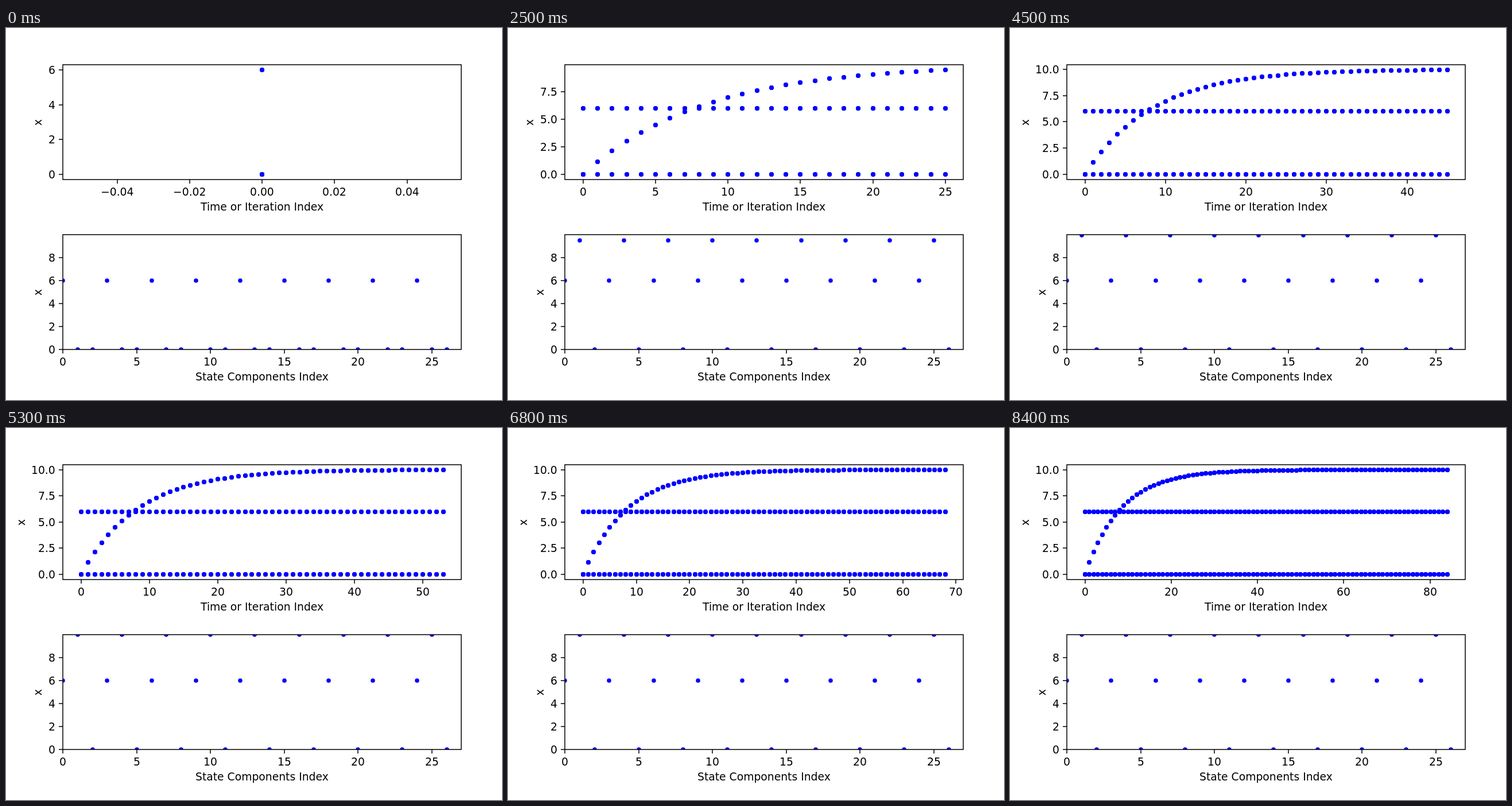
Recreate the animation shown at these times as an HTML page with a canvas. Size 864 by 648 pixels, loop 8.5 s.

```html
<!DOCTYPE html>
<html lang="en">
<head>
<meta charset="utf-8">
<title>State plot</title>
<style>
  html, body { margin: 0; width: 100%; height: 100%; overflow: hidden; background: #fff; }
  canvas { display: block; }
</style>
</head>
<body>
<canvas id="stage" width="864" height="648"></canvas>
<script>
const ctx = document.getElementById("stage").getContext("2d");
const STEP_MS = 100, STEPS = 85;
const FONT_SIZE = 18.75, TICK = 7, TICK_PAD = 13.1;
const LEFT = 99.3, WIDTH = 694, HEIGHT = 200;
const COMPONENTS = 27, FIXED = 6;

const rising = n => 10 * (1 - Math.exp(-0.1193 * n));

// Smallest "nice" step that gives at most maxBins intervals.
function niceStep(range, maxBins) {
  const raw = range / maxBins - 1e-9;
  const scale = 10 ** Math.floor(Math.log10(raw));
  return [1, 2, 2.5, 5, 10].find(m => m * scale >= raw) * scale;
}

function makeTicks([lo, hi], maxBins) {
  const step = niceStep(hi - lo, maxBins);
  let decimals = 0;
  while (Math.abs(step * 10 ** decimals - Math.round(step * 10 ** decimals)) > 1e-6) decimals++;
  const ticks = [];
  for (let k = Math.ceil(lo / step - 1e-9); k * step <= hi + 1e-9; k++) {
    const value = k * step;
    ticks.push({ value, label: value.toFixed(decimals).replace("-", "\u2212") });
  }
  return ticks;
}

function line(x1, y1, x2, y2) {
  ctx.beginPath();
  ctx.moveTo(x1, y1);
  ctx.lineTo(x2, y2);
  ctx.stroke();
}

function centredText(text, x, baseline) {
  ctx.fillText(text, Math.round(x - ctx.measureText(text).width / 2), baseline);
}

function plot({ top, xLim, yLim, xTicks, yTicks, title, points }) {
  const toX = v => Math.round(LEFT + WIDTH * (v - xLim[0]) / (xLim[1] - xLim[0]));
  const toY = v => Math.round(top + HEIGHT * (yLim[1] - v) / (yLim[1] - yLim[0]));
  const left = Math.round(LEFT), right = Math.round(LEFT + WIDTH);
  const upper = Math.round(top), lower = Math.round(top + HEIGHT);

  ctx.save();
  ctx.beginPath();
  ctx.rect(left, upper, right - left, lower - upper);
  ctx.clip();
  ctx.fillStyle = "#00f";
  for (const [x, y] of points) {
    ctx.beginPath();
    ctx.arc(toX(x), toY(y), 3.75, 0, 2 * Math.PI);
    ctx.fill();
  }
  ctx.restore();

  ctx.fillStyle = ctx.strokeStyle = "#000";
  ctx.lineWidth = 1.5;
  ctx.strokeRect(left, upper, right - left, lower - upper);

  for (const { value, label } of xTicks) {
    const x = toX(value);
    line(x, lower, x, lower + TICK);
    centredText(label, x, lower + 28);
  }

  let labelWidth = 0;
  for (const { value, label } of yTicks) {
    const y = toY(value), width = ctx.measureText(label).width;
    line(left, y, left - TICK, y);
    ctx.fillText(label, Math.round(LEFT - TICK_PAD - width), y + 7);
    labelWidth = Math.max(labelWidth, width);
  }

  centredText(title, LEFT + WIDTH / 2, lower + 54);
  ctx.save();
  ctx.translate(Math.round(LEFT - TICK_PAD - labelWidth - 11.9), Math.round(top + HEIGHT / 2));
  ctx.rotate(-Math.PI / 2);
  centredText("x", 0, 0);
  ctx.restore();
}

const stateAt = n => Array.from({ length: COMPONENTS }, (_, i) => [FIXED, rising(n), 0][i % 3]);

function draw(n) {
  ctx.fillStyle = "#fff";
  ctx.fillRect(0, 0, 864, 648);
  ctx.font = `${FONT_SIZE}px "DejaVu Sans", sans-serif`;

  // Every component is drawn, so coincident dots get the harder edges of overdraw.
  const history = [];
  for (let t = 0; t <= n; t++) for (const v of stateAt(t)) history.push([t, v]);

  const peak = Math.max(FIXED, rising(n));
  const xLim = n ? [-0.05 * n, 1.05 * n] : [-0.055, 0.055];
  const yLim = [-0.05 * peak, 1.05 * peak];
  plot({
    top: 63.9, xLim, yLim,
    xTicks: makeTicks(xLim, 9), yTicks: makeTicks(yLim, 5),
    title: "Time or Iteration Index",
    points: history
  });

  plot({
    top: 359.9, xLim: [0, COMPONENTS], yLim: [0, 10],
    xTicks: makeTicks([0, COMPONENTS], 9), yTicks: makeTicks([0, 9.99], 5),
    title: "State Components Index",
    points: stateAt(n).map((v, i) => [i, v])
  });
}

let shown = -1;
function tick() {
  const n = Math.floor(performance.now() / STEP_MS) % STEPS;
  if (n !== shown) draw(shown = n);
  requestAnimationFrame(tick);
}
tick();
</script>
</body>
</html>
```
